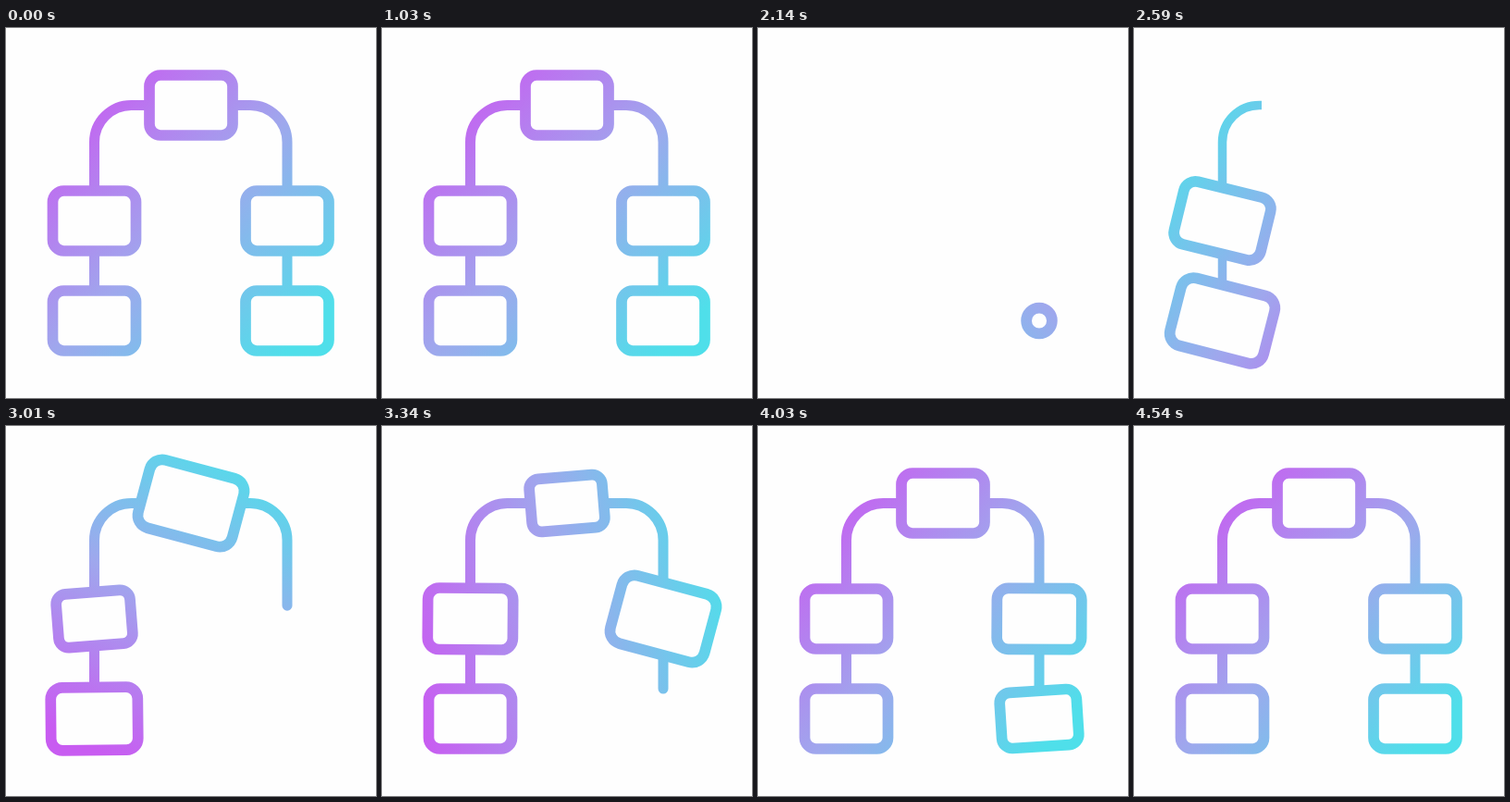
An HTML page with a canvas for the animation above (4570 ms loop, 400 px wide and 400 px high).

```html
<!DOCTYPE html>
<html lang="en">
<head>
<meta charset="utf-8">
<title>Tree diagram loop</title>
<style>
  html, body { margin: 0; width: 100%; height: 100%; overflow: hidden; background: #fefefe; }
  canvas { display: block; }
</style>
</head>
<body>
<canvas id="stage" width="400" height="400"></canvas>
<script>
const ctx = document.getElementById('stage').getContext('2d');
const LOOP = 4570, BACKGROUND = '#fefefe';
const LEFT = 95.5, RIGHT = 304, TOP = 83.5, MIDDLE = 208.5, BOTTOM = 316.5, BEND = 40;
const BEND_LENGTH = BEND * Math.PI / 2;

// leave / enter: times in ms; boxes and links go and come in the same order
const boxes = [
  { x: LEFT, y: BOTTOM, leave: [1020, 1370], enter: 2260 },
  { x: LEFT, y: MIDDLE, leave: [1230, 1580], enter: 2370 },
  { x: 200, y: TOP, leave: [1490, 1800], enter: 2710 },
  { x: RIGHT, y: MIDDLE, leave: [1660, 2010], enter: 3040 },
  { x: RIGHT, y: BOTTOM, leave: [1850, 2200], enter: 3365 }
];

const links = [
  { points: [LEFT, BOTTOM, LEFT, MIDDLE], length: BOTTOM - MIDDLE,
    leave: [1330, 1480], enter: [2290, 2400], thinStart: true },
  { points: [LEFT, MIDDLE, LEFT, TOP, 200, TOP], length: MIDDLE - TOP + 200 - LEFT - 2 * BEND + BEND_LENGTH,
    leave: [1560, 1720], enter: [2400, 2670], thinStart: true },
  { points: [200, TOP, RIGHT, TOP, RIGHT, MIDDLE], length: MIDDLE - TOP + RIGHT - 200 - 2 * BEND + BEND_LENGTH,
    leave: [1760, 1920], enter: [2750, 3030] },
  { points: [RIGHT, MIDDLE, RIGHT, BOTTOM], length: BOTTOM - MIDDLE,
    leave: [1960, 2080], enter: [3250, 3380] }
];

const popScale = [[0, 0], [300, 1.17], [570, 0.84], [800, 1.07], [1080, 1]];
const popAngle = [[0, 0], [300, 15], [570, -5.5], [840, 1], [1080, 0]];

const lerp = (a, b, u) => a + (b - a) * u;
const ramp = (t, [from, to]) => Math.min(1, Math.max(0, (t - from) / (to - from)));
const easeInOut = u => u ** 1.8 / (u ** 1.8 + (1 - u) ** 1.8);

function keyed(keys, age) {
  const next = keys.findIndex(key => key[0] > age);
  if (next < 0) return keys[keys.length - 1][1];
  const [t0, v0] = keys[next - 1], [t1, v1] = keys[next];
  const u = (age - t0) / (t1 - t0);
  const eased = next === 1 ? Math.sin(u * Math.PI / 2) : (1 - Math.cos(u * Math.PI)) / 2;
  return lerp(v0, v1, eased);
}

function rotatingGradient(t) {
  const angle = Math.PI / 4 + 2 * Math.PI * easeInOut(ramp(t, [1030, 4250]));
  const dx = 180 * Math.cos(angle), dy = 180 * Math.sin(angle);
  const gradient = ctx.createLinearGradient(200 - dx, 200 - dy, 200 + dx, 200 + dy);
  ['#c85cf1', '#9fa7ed', '#4fdfea'].forEach((color, i) => gradient.addColorStop(i / 2, color));
  return gradient;
}

function drawLink({ points, length, leave, enter, thinStart }, t) {
  const gone = ramp(t, leave);
  const start = gone < 1 ? gone : 0;
  const end = gone < 1 ? 1 : ramp(t, enter);
  if (end <= start) return;
  const [x0, y0, x1, y1, x2, y2] = points;
  const growing = thinStart && t > enter[0];
  ctx.beginPath();
  ctx.moveTo(x0, y0);
  if (x2 === undefined) {
    ctx.lineTo(x1, y1);
  } else {
    ctx.arcTo(x1, y1, x2, y2, BEND);
    ctx.lineTo(x2, y2);
  }
  ctx.lineWidth = growing ? lerp(9.5, 11, ramp(t, [2600, 2900])) : 11;
  ctx.lineCap = growing ? 'butt' : 'round';
  ctx.setLineDash([length * (end - start), 999]);
  ctx.lineDashOffset = -length * start;
  ctx.stroke();
  ctx.setLineDash([]);
}

function drawBox({ x, y, leave, enter }, t) {
  let halfWidth = 45, halfHeight = 32.5, radius = 12, angle = 0;
  if (t < enter) {
    // shrink while the rectangle rounds into a ring
    const shrink = ramp(t, leave) ** 2;
    const roundness = Math.min(1, shrink / 0.6);
    halfWidth *= 1 - shrink;
    halfHeight = halfWidth * lerp(32.5 / 45, 1, roundness);
    radius = halfHeight * lerp(12 / 32.5, 1, roundness);
  } else {
    const scale = keyed(popScale, t - enter);
    halfWidth *= scale;
    halfHeight *= scale;
    radius *= scale;
    angle = keyed(popAngle, t - enter) * Math.PI / 180;
  }
  if (halfWidth < 0.5) return;

  const outline = new Path2D(), placed = new Path2D();
  outline.roundRect(-halfWidth, -halfHeight, 2 * halfWidth, 2 * halfHeight, radius);
  placed.addPath(outline, new DOMMatrix().translate(x, y).rotate(angle * 180 / Math.PI));
  ctx.lineWidth = 11.7;
  ctx.fill(placed);
  ctx.stroke(placed);
}

function draw(t) {
  ctx.fillStyle = BACKGROUND;
  ctx.fillRect(0, 0, 400, 400);
  ctx.strokeStyle = rotatingGradient(t);
  links.forEach(link => drawLink(link, t));
  boxes.forEach(box => drawBox(box, t));
}

const begin = performance.now();
function tick() {
  draw((performance.now() - begin) % LOOP);
  requestAnimationFrame(tick);
}
tick();
</script>
</body>
</html>
```
